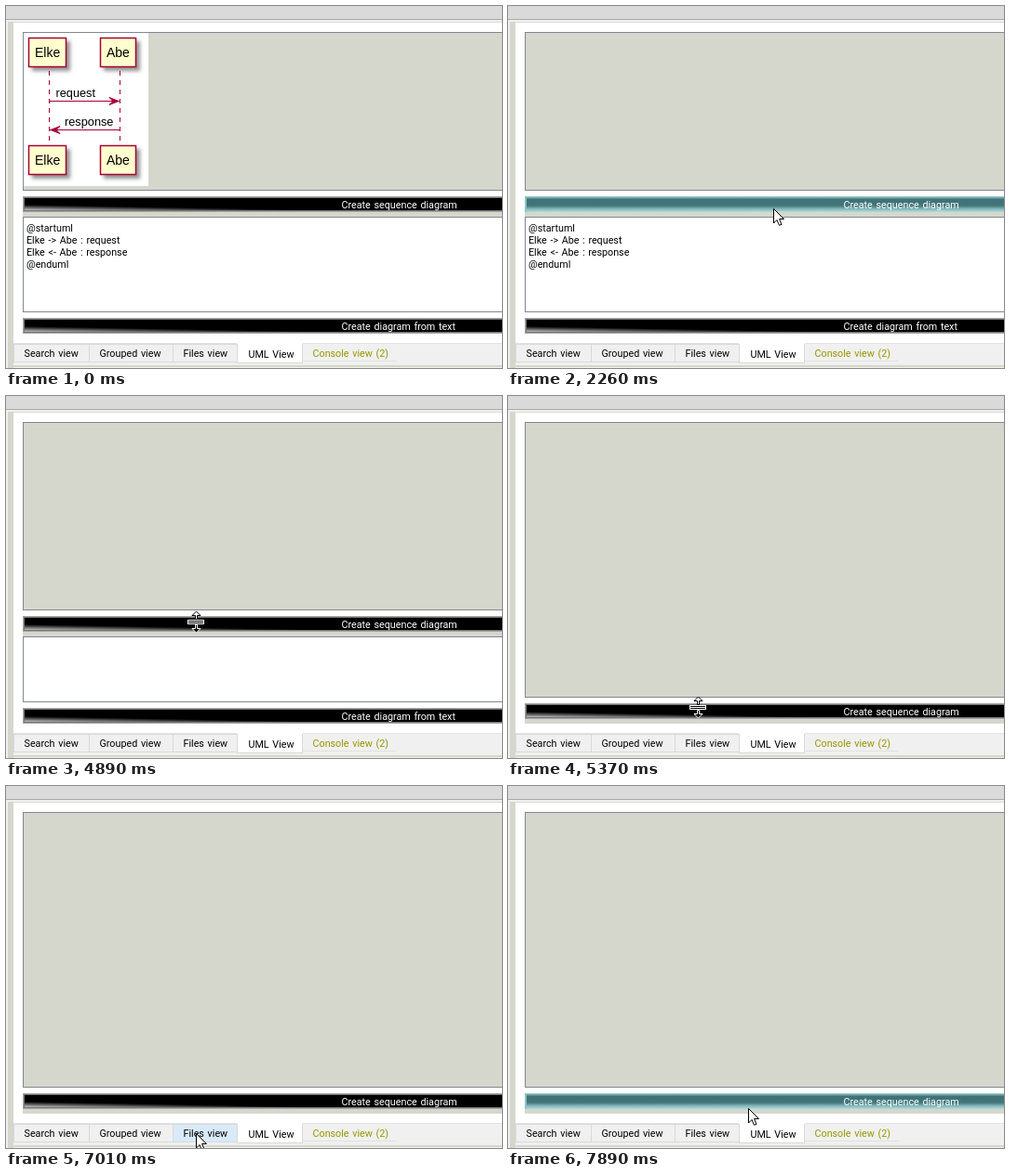
These frames come from a looping animation (533 by 390 pixels, 8000 ms). An HTML page with a canvas:

```html
<!DOCTYPE html>
<html lang="en">
<head>
<meta charset="utf-8">
<title>UML view</title>
<style>
html, body { margin: 0; width: 533px; height: 390px; overflow: hidden; }
canvas { display: block; }
</style>
</head>
<body>
<canvas id="stage" width="533" height="390"></canvas>
<script>
const c = document.getElementById('stage').getContext('2d');
const LOOP = 8000, STEP = 96, W = 533;
const UI = '10.75px Roboto, sans-serif';
const SANS = '"Liberation Sans", sans-serif';
const BEIGE = '#d5d7cd', RED = '#a80036', BLUE = '#0078d7', EDGE = '#828790';
const script = ['@startuml', 'Elke -> Abe : request', 'Elke <- Abe : response', '@enduml'];
const path = 'H:/dlt_viewer_2_19_0_Qt_5_15_0_MSVC2019_64bit-Release/index/2021-03-15_17-32-46_16552_dlt-viewer';
const tabs = ['Search view', 'Grouped view', 'Files view', 'UML View', 'Console view (2)'];
const tabEdges = [8, 89, 179, 249, 318, 420];

// Pointer moves: each leads from the place before to x, y
const moves = [
  { from: 200, to: 770, x: 224, y: 169 },
  { from: 2260, to: 2260, x: 285, y: 218 },
  { from: 2360, to: 2450, x: 250, y: 246 },
  { from: 2650, to: 2840, x: 150, y: 275 },
  { from: 3340, to: 3630, x: 206, y: 230 },
  { from: 3920, to: 3920, x: 204, y: 220 },
  { from: 4220, to: 4610, x: 204, y: 224 },
  { from: 4800, to: 4890, x: 204, y: 243 },
  { from: 4990, to: 5560, x: 204, y: 372 },
  { from: 5660, to: 6230, x: 110, y: 347 },
  { from: 6430, to: 6620, x: 108, y: 352 },
  { from: 6910, to: 7010, x: 204, y: 374 },
  { from: 7210, to: 7500, x: 272, y: 374 },
  { from: 7600, to: 7890, x: 258, y: 347 }
];

// The pointer is seen in whole steps, the first one at the start of a move
function pointer(t) {
  if (t < moves[0].from) return null;
  let p = { x: 408, y: 312 };
  for (const m of moves) {
    if (t < m.from) break;
    const steps = Math.round((m.to - m.from) / STEP) + 1;
    const k = Math.min(1, Math.floor((t - m.from) / STEP + 1.08) / steps);
    p = { x: Math.round(p.x + (m.x - p.x) * k), y: Math.round(p.y + (m.y - p.y) * k) };
  }
  return p;
}

function fill(x, y, w, h, color) {
  c.fillStyle = color;
  c.fillRect(x, y, w, h);
}

function box(x, y, w, h, color, edge) {
  fill(x, y, w, h, edge);
  fill(x + 1, y + 1, w - 2, h - 2, color);
}

function text(s, x, y, color = '#000', font = UI) {
  c.font = font;
  c.wordSpacing = font === UI ? '1px' : '0px';
  c.fillStyle = color;
  c.fillText(s, x, y);
}

function poly(points, color, edge) {
  c.beginPath();
  for (let i = 0; i < points.length; i += 2) c.lineTo(points[i], points[i + 1]);
  c.closePath();
  c.fillStyle = color;
  c.fill();
  c.strokeStyle = edge;
  c.lineWidth = 1;
  c.stroke();
}

function gradient(x0, y0, x1, y1, colors) {
  const g = c.createLinearGradient(x0, y0, x1, y1);
  colors.forEach((color, i) => g.addColorStop(i / (colors.length - 1), color));
  return g;
}

function button(y, label, hover) {
  if (hover) {
    fill(18, y, W, 17, gradient(0, y, 0, y + 17,
      ['#a5d3d6', '#3f7377', '#3f7377', '#44777a', '#82b7ba', '#b2dcde']));
    fill(18, y, 2, 17, '#8fc4c8');
  } else {
    box(18, y, W, 17, '#777', '#a3a3a3');
    // slightly tilted, so the light wedge thins out to the right
    fill(20, y + 2, W, 13, gradient(20, y + 9, 19.87, y + 16, ['#000', '#e0e0e0']));
  }
  text(label, 360.5, y + 13, '#fff');
}

function actor(name, x, y) {
  const font = '14px ' + SANS;
  c.font = font;
  c.wordSpacing = '0px';
  const w = Math.round(c.measureText(name).width) + 14;
  c.save();
  c.shadowColor = 'rgba(0,0,0,.42)';
  c.shadowOffsetX = c.shadowOffsetY = 4;
  c.shadowBlur = 4;
  fill(x, y, w, 32, '#fefece');
  c.restore();
  c.strokeStyle = RED;
  c.lineWidth = 1.5;
  c.strokeRect(x + 0.5, y + 0.5, w - 1, 31);
  text(name, x + 7, y + 21, '#000', font);
}

function message(label, x, y, tip, dir) {
  fill(46, y, 76, 1, RED);
  const m = y + 0.5, back = tip - dir * 10;
  poly([back, m - 4, tip, m, back, m + 4, back + dir * 4, m], RED, RED);
  text(label, x, y - 4.5, '#000', '12.75px ' + SANS);
}

function diagram() {
  fill(19, 29, 134, 165, '#fff');
  for (const x of [46, 122])
    for (let y = 70; y < 149; y += 10) fill(x, y, 1, 5, RED);
  for (const y of [34, 150]) {
    actor('Elke', 24, y);
    actor('Abe', 101, y);
  }
  message('request', 53.5, 102, 121, 1);
  message('response', 63, 133, 48, -1);
}

function editor(top, t) {
  box(18, top, W, 330 - top, '#fff', t >= 2650 && t < 4800 ? BLUE : EDGE);
  if (t >= 3340) return;
  const selected = t >= 3140;
  script.forEach((s, i) => {
    const y = 243 + 13 * i;
    c.font = UI;
    if (selected) fill(23, y - 11, c.measureText(s).width + 3, 13, BLUE);
    text(s, 22, y, selected ? '#fff' : '#000');
  });
}

function tabBar(active, p) {
  fill(8, 364, W, 26, '#f0f0f0');
  fill(8, 363, W, 1, '#e2e2e2');
  fill(318, 382, 102, 1, '#e2e2e2');
  tabs.forEach((label, i) => {
    const l = tabEdges[i], r = tabEdges[i + 1], last = i === tabs.length - 1;
    const hover = p && p.y >= 364 && p.y < 384 && p.x >= l && p.x < r;
    if (i !== active && !last) box(l, 364, r - l + 1, 20, hover ? '#d8eaf9' : '#f0f0f0', '#d9d9d9');
    text(label, l + 11.5, 378, last ? '#969600' : '#000');
  });
  const l = tabEdges[active], w = tabEdges[active + 1] - l + 2;
  box(l - 1, 361, w, 24, '#fff', '#d9d9d9');
  fill(l - 1, 361, w, 3, '#fff');
  text(tabs[active], l + 11.5, 379);
  fill(3, 387, W, 2, BEIGE);
}

function arrow() {
  poly([0.5, 0.5, 0.5, 16, 4, 12.5, 6.5, 18.3, 9, 17.3, 6.6, 11.5, 11.5, 11.5], '#fff', '#000');
}

function beam() {
  fill(0, -7, 1, 14, '#000');
  for (const y of [-8, 7]) {
    fill(-4, y, 4, 1, '#000');
    fill(1, y, 4, 1, '#000');
  }
}

function splitter() {
  for (const s of [-1, 1]) {
    c.save();
    c.translate(0.5, 0.5);
    c.scale(1, s);
    poly([0, 11.5, 4.5, 7, 1, 7, 1, 3, -1, 3, -1, 7, -4.5, 7], s < 0 ? '#fff' : '#000', s < 0 ? '#000' : '#fff');
    c.restore();
  }
  fill(-9, -2, 18, 5, '#fff');
  for (const y of [-1, 1]) fill(-8, y, 16, 1, '#000');
}

function draw(t) {
  const p = pointer(t);
  const files = t >= 7210 && t < 7700;
  const drag = t >= 4800 && t < 5660;
  const collapsed = t >= 5270;
  const shift = collapsed ? 126 : drag ? Math.min(32, p.y - 211) : 0;
  const top = 205 + shift, handle = top + 17;

  fill(0, 0, W, 390, '#f0f0f0');
  fill(0, 0, W, 14, '#dadada');
  fill(0, 14, W, 1, '#a8a8a8');
  fill(2, 17, W, 1, '#dcdcd6');
  fill(2, 17, 6, 373, BEIGE);
  fill(8, 18, W, 346, '#fff');

  if (files) {
    box(18, 28, W, 325, '#fff', EDGE);
    c.letterSpacing = '0.215px';
    text(path, 22, 44);
    c.letterSpacing = '0px';
  } else {
    box(18, 28, W, 171 + shift, BEIGE, EDGE);
    if (t < 2260) diagram();
    const hover = p && t >= 2260 && !drag && p.y >= top && p.y < handle;
    button(top, 'Create sequence diagram', hover);
    fill(18, handle, W, 5, BEIGE);
    if (!collapsed) {
      editor(handle + 5, t);
      button(336, 'Create diagram from text');
    }
  }
  tabBar(files ? 2 : 3, p);

  if (!p) return;
  const onHandle = !files && p.y >= handle && p.y < handle + 5;
  const onText = !collapsed && p.y >= handle + 5 && p.y < 330;
  c.save();
  c.translate(p.x, p.y);
  if (drag || onHandle) splitter();
  else if (onText) beam();
  else arrow();
  c.restore();
}

function frame() {
  draw(performance.now() % LOOP);
  requestAnimationFrame(frame);
}
frame();
</script>
</body>
</html>
```
